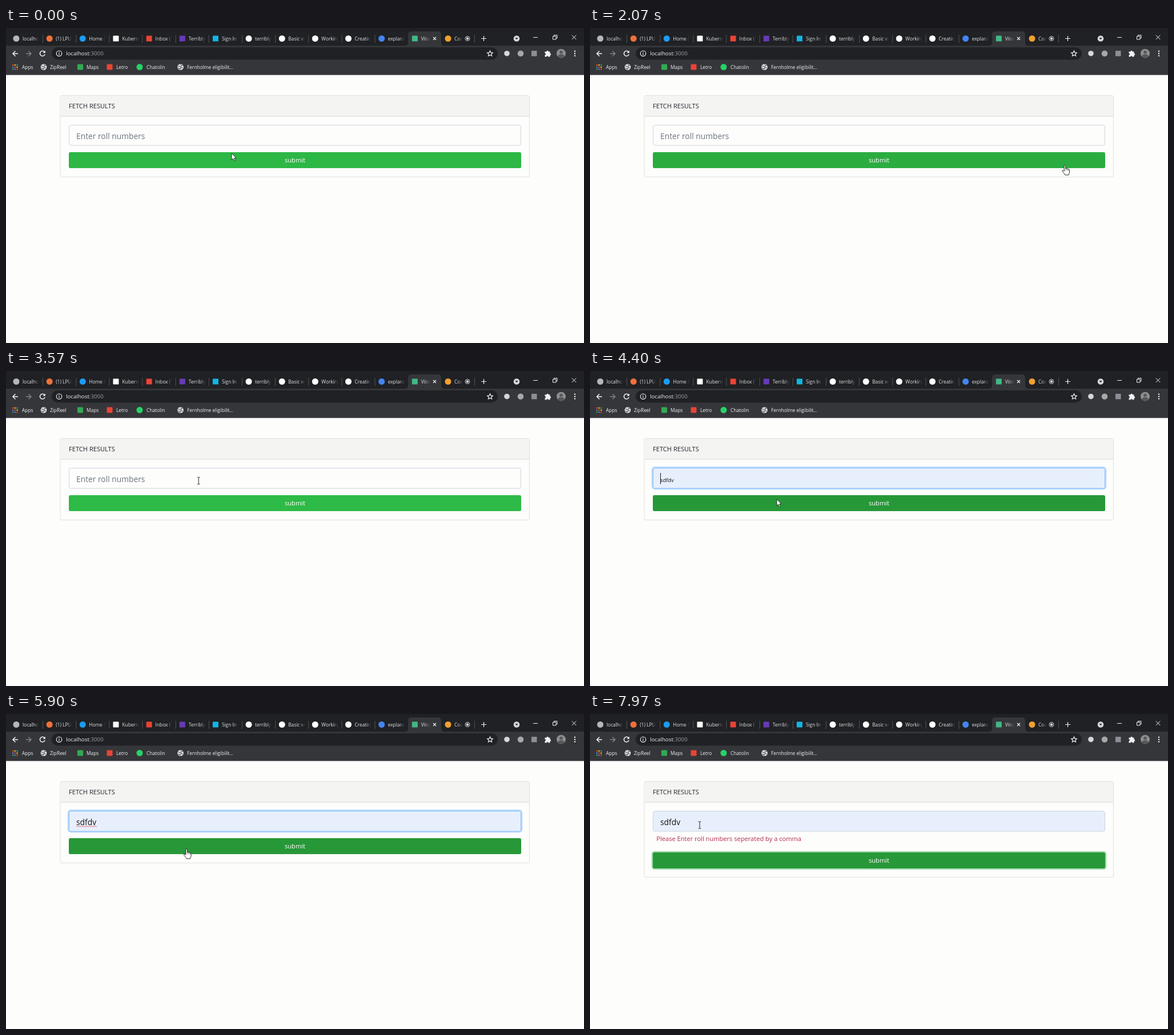
An HTML page for the animation above (8 s loop, 1012 px wide and 553 px high).

```html
<!DOCTYPE html>
<html lang="en">
<head>
<meta charset="utf-8">
<title>Fetch results</title>
<style>
  html, body { margin: 0; width: 100%; height: 100%; overflow: hidden; background: #fdfdfb; }
  svg { display: block; width: 100vw; height: 100vh; }
  text { font-family: "Open Sans", "Noto Sans", sans-serif; white-space: pre; }
  .ui { font-size: 8.35px; fill: #f1f2f4; }
  .line { fill: none; stroke: #f1f2f4; stroke-width: 1.2; }
  .body { font-size: 11.1px; }
  .big { font-size: 13.8px; }
</style>
</head>
<body>
<svg viewBox="0 0 1012 553">
  <defs>
    <linearGradient id="fade">
      <stop offset="0" stop-color="#202124" stop-opacity="0"/>
      <stop offset="1" stop-color="#202124"/>
    </linearGradient>
    <linearGradient id="fadeOn">
      <stop offset="0" stop-color="#35363a" stop-opacity="0"/>
      <stop offset="1" stop-color="#35363a"/>
    </linearGradient>
    <g id="globe">
      <circle r="5.3" fill="#f1f2f4"/>
      <path d="M-4.2-1.5q2-.4 3 .6t2.2.4-.5 2.2-1.6 2.2-1.6-1.6-1.5-1.2M.2-4.2l1.4 1.6 2.4.2M2.2 2.8l1.4-2" fill="none" stroke="#35363a" stroke-width="1.1"/>
    </g>
  </defs>

  <rect width="1012" height="553" fill="#fdfdfb"/>
  <rect width="1012" height="32" fill="#202124"/>
  <rect y="31" width="1012" height="51.5" fill="#35363a"/>
  <path d="M698 31q6 0 6-6V12q0-6 6-6h46q6 0 6 6v13q0 6 6 6z" fill="#35363a"/>
  <g id="tabs"></g>

  <g class="line">
    <path d="M748 16l5 5m0-5l-5 5M832 18.5h9M836.500 14v9"/>
    <path d="M923 16.500h8M990.800 12.500l7.500 7.500m0-7.500l-7.500 7.500" stroke-width="1"/>
    <path d="M957.500 14.500h5.500v5.500h-5.500zM959.500 14v-1.500h5.500v5.500h-1.500" stroke-width="1"/>
    <circle cx="808" cy="18.500" r="4" stroke-width="1" stroke="#d5d7da"/>
    <path d="M21 45h-9m4.500-4.500L12 45l4.500 4.500" stroke-width="1.500"/>
    <path d="M35 45h9m-4.500-4.500L44 45l-4.500 4.500" stroke="#85878b" stroke-width="1.400"/>
    <path d="M67.300 42a4.400 4.400 0 1 0 .8 4" stroke-width="1.500"/>
  </g>
  <path d="M68.800 39.500v4.300h-4.300z" fill="#f1f2f4"/>
  <circle cx="808" cy="18.500" r="2.300" fill="#d5d7da"/>
  <circle cx="894" cy="18.500" r="5.300" fill="#d5d7da"/>
  <path d="M891.500 17.300h5l-2.500 3z" fill="#202124"/>

  <rect x="80" y="34" width="781" height="21.500" rx="10.750" fill="#202124"/>
  <g class="line" stroke-width="1">
    <circle cx="93" cy="44.700" r="4.700"/>
    <path d="M93 44v3.300M93 41.700v1.200"/>
    <path d="M847.500 40l1.400 3.100 3.400.4-2.500 2.300.7 3.300-3-1.700-3 1.700.7-3.300-2.500-2.300 3.400-.4z"/>
  </g>
  <text x="105" y="48.200" font-size="9.750" fill="#f1f2f4">localhost<tspan fill="#9aa0a6">:3000</tspan></text>
  <circle cx="877" cy="44.700" r="4.800" fill="#d5d7da"/>
  <circle cx="901" cy="44.700" r="5.300" fill="#a5a7aa"/>
  <rect x="920" y="40" width="9.500" height="9.500" fill="#8b9097"/>
  <path d="M943.500 41.500h3a1.700 1.700 0 0 1 3.400 0h2.600v3a1.700 1.700 0 0 1 0 3.400v2.600h-3a1.500 1.500 0 0 0-3 0h-3v-3a1.600 1.600 0 0 0 0-3.200z" fill="#f1f2f4"/>
  <circle cx="972" cy="44.700" r="8" fill="#8b8f90"/>
  <path d="M966 50q1-4 6-4t6 4q-6 5.500-12 0" fill="#55595a"/>
  <circle cx="972" cy="42.500" r="2.800" fill="#55595a"/>
  <g fill="#f1f2f4"><circle cx="996" cy="40.800" r="1.200"/><circle cx="996" cy="44.800" r="1.200"/><circle cx="996" cy="48.800" r="1.200"/></g>
  <g id="marks"></g>

  <rect id="card" x="95" y="118.500" width="821.500" height="143" rx="3" fill="#fdfdfc" stroke="#dfdfda"/>
  <path d="M95.500 155v-33q0-3 3-3h814.500q3 0 3 3v33z" fill="#f4f4f2"/>
  <path d="M95 155h821.500" stroke="#dadad7"/>
  <text class="body" x="110" y="141" fill="#212529">FETCH RESULTS</text>

  <rect id="glow" x="109" y="169" width="794" height="38" rx="4.500" fill="none" stroke="#b9dafc" stroke-width="2.400"/>
  <rect id="field" x="110.500" y="170.500" width="791" height="35.500" rx="3.200"/>
  <text id="value" x="123" y="194.700"></text>
  <path id="squiggle" d="M123 197.300" fill="none" stroke="#e23b4b" stroke-width=".9"/>
  <path id="caret" d="M0 179v19.500" stroke="#111" stroke-width="1"/>
  <text id="error" class="body" x="116.300" y="222.700" fill="#b52d4c">Please Enter roll numbers seperated by a comma</text>

  <g id="button">
    <rect id="ring" x="109" y="217" width="794" height="30" rx="4" fill="none" stroke="#9fdcab" stroke-width="2.600"/>
    <rect id="fill" x="110" y="218" width="792" height="28" rx="2.800"/>
    <text class="body" x="506" y="236.200" text-anchor="middle" fill="#fff">submit</text>
  </g>

  <g id="pointer">
    <path id="arrow" d="M0 0V11.500L2.600 9.100 4.500 13.500 6.400 12.700 4.500 8.400H8Z" fill="#fff" stroke="#111" stroke-width=".8"/>
    <g id="hand" stroke="#111" stroke-width=".9">
      <path d="M-1.300 10.500V1.300a1.300 1.300 0 0 1 2.600 0V6c.3-.9 2.400-.8 2.500.5.4-.8 2.200-.6 2.300.7.5-.6 1.900-.3 1.900.9V12c0 2-1.400 2.800-1.400 5H.2c-.4-2-3.200-4-4.600-6.400-.8-1.500 1.200-2.400 2.100-1.200Z" fill="#fff"/>
      <path d="M1.300 6v3M3.800 6.500V9.300M6.100 7.200V9.600" fill="none" stroke-width=".6"/>
    </g>
    <path id="beam" d="M-2.300-6h1.600L0-5.400.7-6h1.600M0-5.400V5.400M-2.300 6h1.600L0 5.400.7 6h1.600" fill="none" stroke="#222" stroke-width="1"/>
  </g>
</svg>
<script>
const LOOP = 8000;
const CLICK_FIELD = 3900, PREVIEW = 4150, PICK = 4850, SUBMIT = 6250;
const $ = id => document.getElementById(id);

// icon shape, icon colour, label
const tabs = [
  ["c", "#b4b6b8", "localhost"], ["c", "#f0703a", "(1) LPU"], ["c", "#1d9bf0", "Home /"],
  ["s", "#ffffff", "Kubern"], ["s", "#ea4335", "Inbox (1"], ["s", "#673ab7", "Terribly"],
  ["s", "#12b5e5", "Sign In"], ["c", "#ffffff", "terribly"], ["c", "#ffffff", "Basic w"],
  ["c", "#ffffff", "Working"], ["c", "#ffffff", "Creating"], ["c", "#4285f4", "explana"],
  ["s", "#41b883", "Vite"], ["c", "#f0a030", "Coo"]
];
// icon shape, icon colour, icon x, label x, label
const marks = [
  ["g", "", 66, 77, "ZipReel"], ["s", "#34a853", 130, 141, "Maps"], ["s", "#ea4335", 181.5, 193, "Letro"],
  ["c", "#25d366", 234, 246, "Chatolin"], ["g", "", 305.5, 317, "Fernholme eligibilit..."]
];

function icon(shape, color, x, y) {
  if (shape === "g") return `<use href="#globe" x="${x}" y="${y}"/>`;
  return shape === "c"
    ? `<circle cx="${x}" cy="${y}" r="5.500" fill="${color}"/>`
    : `<rect x="${x - 5}" y="${y - 5}" width="10" height="10" rx="1" fill="${color}"/>`;
}

$("tabs").innerHTML = tabs.map(([shape, color, label], i) => {
  const x = 18 + i * 58.15, active = i === 12;
  const width = i > 11 ? 14 : 28;
  const bar = i < 11 || i === 13 ? `<path d="M${(x + 46.5).toFixed(1)} 12v14" stroke="#505256"/>` : "";
  return icon(shape, color, x, 18.5) +
    `<clipPath id="tab${i}"><rect x="${x + 10}" y="8" width="${width + 1}" height="20"/></clipPath>` +
    `<g clip-path="url(#tab${i})"><text class="ui" x="${x + 11}" y="21.500" fill-opacity=".92">${label}</text>` +
    `<rect x="${x + 4 + width}" y="8" width="7" height="20" fill="url(#${active ? "fadeOn" : "fade"})"/></g>` + bar;
}).join("");

const dots = ["#ea4335", "#fbbc05", "#34a853", "#4285f4"];
let apps = "";
for (let i = 0; i < 9; i++) {
  apps += `<rect x="${11 + i % 3 * 3.7}" y="${63.8 + Math.floor(i / 3) * 3.7}" width="2.300" height="2.300" fill="${dots[i % 4]}"/>`;
}
$("marks").innerHTML = apps + '<text class="ui" x="28" y="71.500">Apps</text>' +
  marks.map(([shape, color, x, tx, label]) =>
    icon(shape, color, x, 68.5) + `<text class="ui" x="${tx}" y="71.500">${label}</text>`).join("");

$("squiggle").setAttribute("d", "M123 197.300" + "q.9-1.800 1.800 0t1.800 0".repeat(10));

// time, x, y
const path = [
  [0, 395, 220], [400, 470, 240], [830, 590, 224], [1250, 690, 212], [1630, 770, 221],
  [1850, 824, 254], [2000, 833, 248], [2070, 831.5, 241], [2400, 790, 232], [2730, 724, 222],
  [3000, 600, 252], [3300, 420, 215], [3600, 335, 192], [3900, 331, 194], [4150, 328, 218],
  [4400, 327, 225], [4750, 325, 256], [4970, 324, 250], [5400, 318, 239], [5900, 316, 237],
  [6250, 316, 237], [6640, 311.5, 237.5], [7000, 300, 262], [7470, 280, 299], [7600, 268, 296],
  [7970, 192, 195], [LOOP, 192, 195]
];

function pointerAt(t) {
  const i = Math.max(1, path.findIndex(p => p[0] >= t));
  const [t0, x0, y0] = path[i - 1], [t1, x1, y1] = path[i];
  const u = (t - t0) / (t1 - t0), k = u * u * (3 - 2 * u);
  return { x: x0 + (x1 - x0) * k, y: y0 + (y1 - y0) * k };
}

const buttonTop = t => t >= SUBMIT ? 243 : 218;

function overButton(t) {
  const { x, y } = pointerAt(t), top = buttonTop(t);
  return x > 110 && x < 902 && y > top && y < top + 28;
}

// Share of the last 150 ms that the button was hovered or focused
function buttonTone(t) {
  if (t >= SUBMIT) return 1;
  let sum = 0;
  for (let k = 0; k < 10; k++) {
    const past = t - k * 15;
    if (past > 0 && overButton(past)) sum++;
  }
  return sum / 10;
}

const mix = (a, b, k) => `rgb(${a.map((v, i) => Math.round(v + (b[i] - v) * k))})`;
const show = (id, on) => $(id).setAttribute("visibility", on ? "visible" : "hidden");

function draw(t) {
  const focused = t >= CLICK_FIELD && t < SUBMIT;
  const preview = t >= PREVIEW && t < PICK;
  const filled = t >= PICK, failed = t >= SUBMIT;
  const shift = failed ? 25 : 0;

  const ease = focused ? Math.min(1, (t - CLICK_FIELD) / 150) : 0;
  show("glow", focused);
  $("glow").setAttribute("opacity", ease);
  $("field").setAttribute("fill", t >= PREVIEW ? "#e7effc" : "#fdfdfc");
  $("field").setAttribute("stroke", mix([206, 210, 218], [128, 189, 250], ease));

  const value = $("value");
  value.textContent = t >= PREVIEW ? "sdfdv" : "Enter roll numbers";
  value.setAttribute("class", preview ? "" : "big");
  value.setAttribute("font-size", 9.3);
  value.setAttribute("fill", t >= PREVIEW ? "#111" : "#6c757d");
  show("squiggle", filled && !failed);

  const blinkStart = filled ? PICK : CLICK_FIELD;
  show("caret", focused && (t - blinkStart) % 1060 < 530);
  $("caret").setAttribute("transform", `translate(${filled ? 159.5 : 123.5})`);

  show("error", failed);
  show("ring", failed);
  $("card").setAttribute("height", 143 + shift);
  $("button").setAttribute("transform", `translate(0 ${shift})`);
  $("fill").setAttribute("fill", mix([46, 186, 70], [39, 152, 56], buttonTone(t)));

  const { x, y } = pointerAt(t);
  const popup = t >= CLICK_FIELD + 100 && t < PICK;
  const inField = y > 170 && y < 206;
  const kind = inField ? "beam" : t > 40 && !popup && overButton(t) ? "hand" : "arrow";
  for (const id of ["arrow", "hand", "beam"]) show(id, id === kind);
  $("pointer").setAttribute("transform", `translate(${x.toFixed(2)} ${y.toFixed(2)})`);
}

const start = performance.now();
function tick() {
  draw((performance.now() - start) % LOOP);
  requestAnimationFrame(tick);
}
tick();
</script>
</body>
</html>
```
